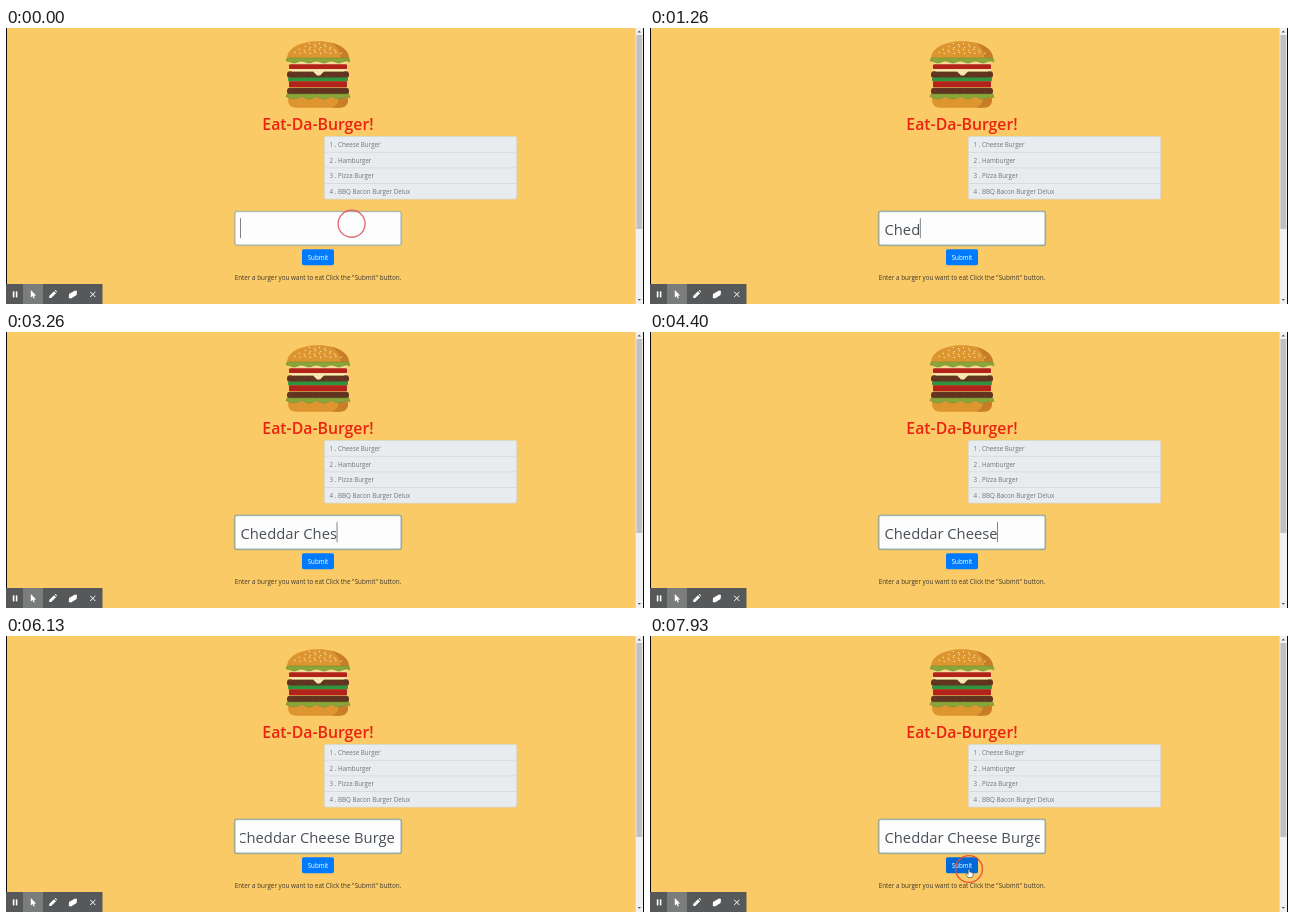
Write an HTML page with a canvas that moves like this. It is 638 by 276 pixels and loops after 8 s.

```html
<!DOCTYPE html>
<html lang="en">
<head>
<meta charset="utf-8">
<title>Eat-Da-Burger!</title>
<style>
  html, body { margin: 0; width: 100%; height: 100%; overflow: hidden; background: #faca67; }
  canvas { display: block; width: 638px; height: 276px; }
</style>
</head>
<body>
<canvas id="stage"></canvas>
<script>
const W = 638, H = 276, LOOP = 8000;
const canvas = document.getElementById('stage');
const ctx = canvas.getContext('2d');
const dpr = window.devicePixelRatio || 1;
canvas.width = W * dpr;
canvas.height = H * dpr;

const FONT = '"Open Sans", "Noto Sans", sans-serif';
const BURGERS = ['Cheese Burger', 'Hamburger', 'Pizza Burger', 'BBQ Bacon Burger Delux'];

// [time, text] for every key press
const KEYS = [[0, '']];
function type(text, times) {
  const before = KEYS[KEYS.length - 1][1];
  times.forEach((t, i) => KEYS.push([t, before + text.slice(0, i + 1)]));
}
type('Cheddar ', [800, 900, 1130, 1250, 1400, 1600, 1730, 1860]);
type('Ches', [2130, 2260, 2530, 3130]);
KEYS.push([3860, 'Cheddar Che']);
type('ese Burge', [4060, 4200, 4400, 4600, 4800, 4900, 5130, 5190, 5250]);

const BLINK = 535, BLUR = 7800, MOVE_START = 7000, MOVE_END = 7720;
const clamp = (v, a = 0, b = 1) => Math.min(b, Math.max(a, v));
const ease = k => k * k * (3 - 2 * k);
const mix = (a, b, k) => a + (b - a) * k;

function box(x, y, w, h, r, fill, stroke, lw = 1) {
  ctx.beginPath();
  ctx.roundRect(x, y, w, h, r);
  if (fill) { ctx.fillStyle = fill; ctx.fill(); }
  if (stroke) { ctx.strokeStyle = stroke; ctx.lineWidth = lw; ctx.stroke(); }
}

function poly(points, fill) {
  ctx.beginPath();
  points.forEach(([x, y]) => ctx.lineTo(x, y));
  ctx.closePath();
  ctx.fillStyle = fill;
  ctx.fill();
}

function label(text, x, y, size, color, align = 'left', weight = 400) {
  ctx.font = `${weight} ${size}px ${FONT}`;
  ctx.textAlign = align;
  ctx.fillStyle = color;
  ctx.fillText(text, x, y);
}

function lettuce(y) {
  ctx.beginPath();
  ctx.moveTo(281, y);
  ctx.lineTo(343, y);
  for (let x = 344; x >= 280; x--) ctx.lineTo(x, y + 4 + Math.sin(x * 0.42));
  ctx.closePath();
  ctx.fillStyle = '#88a63a';
  ctx.fill();
  ctx.strokeStyle = '#6b8a2e';
  ctx.lineWidth = 0.5;
  ctx.stroke();
}

function patty(y) {
  box(281, y, 62, 6.8, 3, '#623520');
  for (let i = 0; i < 16; i++) {
    box(284 + i * 3.6, y + 1.6 + (i * 7 % 4), 1.6, 0.9, 0.4, i % 2 ? '#4d2817' : '#744127');
  }
}

// bread with a shaded right side
function bread(path) {
  ctx.save();
  ctx.clip(path);
  ctx.fillStyle = '#dc952f';
  ctx.fillRect(280, 13, 64, 68);
  ctx.fillStyle = '#c97d28';
  ctx.beginPath();
  ctx.moveTo(322, 13);
  ctx.quadraticCurveTo(337, 20, 334, 34);
  ctx.lineTo(333, 70);
  ctx.quadraticCurveTo(333, 77, 324, 81);
  ctx.lineTo(345, 81);
  ctx.lineTo(345, 13);
  ctx.fill();
  ctx.restore();
}

function burger() {
  box(283, 34, 58, 10, 1, '#f1dc96');

  bread(new Path2D('M281 32 C280 20 295 13.3 312 13.3 S344 20 343 32 Z'));
  for (let row = 0; row < 4; row++) {
    const n = 4 + row * 2;
    for (let i = 0; i < n; i++) {
      const x = 311 + (i - (n - 1) / 2) * 5.1 + (row % 2);
      ctx.beginPath();
      ctx.ellipse(x, 15.6 + row * 2.9 + (i % 2), 0.9, 0.6, i, 0, 7);
      ctx.fillStyle = '#f5dca4';
      ctx.fill();
    }
  }

  lettuce(30);
  box(283, 36.3, 58, 4.8, 1.2, '#b3231b');
  patty(43.2);
  poly([[283, 41.4], [341, 41.4], [338, 43.4], [318, 43.6], [314, 47.6], [311, 47.6], [307, 43.6], [286, 43.4]], '#f6e6b0');
  box(282, 49.4, 60, 4, 1.5, '#2f9440');
  box(283, 53.2, 58, 6, 1, '#b3231b');
  patty(59.8);
  bread(new Path2D('M282 69.5 H342 V72 Q342 79.8 333 79.8 H291 Q282 79.8 282 72 Z'));
  lettuce(66);
}

function list() {
  const pitch = 15.72;
  box(318.5, 108.5, 192, pitch * 4 - 0.3, 1.6, '#e9ecef', '#d3d8dc', 0.7);
  BURGERS.forEach((name, i) => {
    const y = 108.5 + i * pitch;
    ctx.fillStyle = '#d0d5d9';
    if (i) ctx.fillRect(318.5, y - 0.4, 192, 0.7);
    label(`${i + 1} . ${name}`, 323.5, y + 10.4, 6.24, '#70767d');
  });
}

function field(t) {
  const focus = clamp(0.45 + t / 200);
  box(228.6, 183.2, 166.8, 34.2, 2.2, null, `rgba(60,125,150,${0.42 * focus})`, 1.5);
  box(229.1, 183.7, 165.8, 33.2, 1.8, '#fdfdfe', '#8fb4c6', 0.8);

  let last = 0;
  let text = '';
  for (const [at, value] of KEYS) {
    if (t >= at) { last = at; text = value; }
  }
  const focused = t < BLUR;
  const left = 234.5, right = 389.6;
  ctx.font = `400 14.75px ${FONT}`;
  const width = ctx.measureText(text).width;
  const scroll = focused ? Math.max(0, width + 0.7 - (right - left)) : 0;

  ctx.save();
  ctx.beginPath();
  ctx.rect(left - 0.5, 184, right - left + 0.7, 33);
  ctx.clip();
  label(text, left - scroll, 206.8, 14.75, '#495057');
  const on = Math.floor(Math.max(0, t - last - 70) / BLINK) % 2 === 0;
  if (focused && on) {
    ctx.fillStyle = '#5f656b';
    ctx.fillRect(left + width - scroll - 0.3, 190.2, 0.8, 20);
  }
  ctx.restore();
}

function arrow(x, y, s, fill, stroke) {
  const pts = [[0, 0], [0, 9], [2.1, 7.2], [3.5, 10.2], [4.8, 9.6], [3.5, 6.7], [6.3, 6.4]];
  poly(pts.map(([a, b]) => [x + a * s, y + b * s]), fill);
  if (stroke) { ctx.strokeStyle = stroke; ctx.lineWidth = 0.5; ctx.stroke(); }
}

function hand(x, y) {
  poly([[x - 0.7, y], [x + 0.7, y], [x + 0.8, y + 3], [x + 4, y + 3.8], [x + 4, y + 6.3],
    [x + 3, y + 8.6], [x - 1, y + 8.6], [x - 3.2, y + 5], [x - 2.2, y + 4.4], [x - 0.8, y + 5.4]], '#fff');
  ctx.strokeStyle = '#333';
  ctx.lineWidth = 0.55;
  ctx.stroke();
}

function ring(x, y, r, color, alpha) {
  ctx.globalAlpha = alpha;
  ctx.beginPath();
  ctx.arc(x, y, r, 0, Math.PI * 2);
  ctx.strokeStyle = color;
  ctx.lineWidth = 1.4;
  ctx.stroke();
  ctx.globalAlpha = 1;
}

function pointer(t) {
  const k = ease(clamp((t - MOVE_START) / (MOVE_END - MOVE_START)));
  return { x: mix(345.6, 319, k), y: mix(195.8, 233, k), moving: t >= MOVE_START };
}

function toolbar() {
  ctx.fillStyle = '#565859';
  ctx.fillRect(0, 256, 96.5, 20);
  ctx.fillStyle = '#7b7c7c';
  ctx.fillRect(17, 256, 20, 20);
  ctx.fillStyle = '#fff';
  ctx.fillRect(6.8, 263.4, 1.6, 6);
  ctx.fillRect(9.8, 263.4, 1.6, 6);
  arrow(24.8, 262, 0.84, '#fff');
  poly([[43.2, 270], [43.2, 268], [48, 263.2], [50, 265.2], [45.2, 270]], '#fff');
  poly([[48.6, 262.6], [49.5, 262], [51, 263.6], [50.6, 264.6]], '#fff');
  poly([[63, 266], [69, 262.6], [71, 263], [70.6, 267], [65, 270.4], [62.8, 270]], '#fff');
  ctx.strokeStyle = '#fff';
  ctx.lineWidth = 1;
  ctx.beginPath();
  ctx.moveTo(84.2, 263.8); ctx.lineTo(89.4, 269);
  ctx.moveTo(89.4, 263.8); ctx.lineTo(84.2, 269);
  ctx.stroke();
}

function scrollbar() {
  ctx.fillStyle = '#f1f1f1';
  ctx.fillRect(629.7, 0, 7.3, H);
  ctx.fillStyle = '#c1c1c1';
  ctx.fillRect(630.4, 7, 5.8, 194);
  poly([[631.6, 4.4], [635, 4.4], [633.3, 2.6]], '#555');
  poly([[631.6, 271], [635, 271], [633.3, 272.8]], '#555');
  ctx.fillStyle = '#0c0b08';
  ctx.fillRect(637, 0, 1, H);
  ctx.fillRect(0, 0, 1, H);
}

function draw(t) {
  ctx.setTransform(dpr, 0, 0, dpr, 0, 0);
  ctx.fillStyle = '#faca67';
  ctx.fillRect(0, 0, W, H);

  burger();
  label('Eat-Da-Burger!', 312, 101.8, 15.8, '#ea2410', 'center', 600);
  list();
  field(t);

  const p = pointer(t);
  const hover = p.moving && p.y > 221 && p.x > 296 && p.x < 328;
  box(296, 221.2, 32, 16, 1.6, hover ? '#0069d9' : '#007bff');
  label('Submit', 312, 231.8, 6.24, '#fff', 'center');
  label('Enter a burger you want to eat Click the "Submit" button.', 312, 251.8, 6.3, '#3f382a', 'center');

  scrollbar();
  toolbar();

  if (hover) hand(p.x, p.y);
  else if (p.moving && p.y > 217) arrow(p.x, p.y, 0.8, '#fff', '#222');

  if (t < 330) {
    const fade = clamp((t - 50) / 280);
    ring(345.6, 195.8, 13.5 + fade * 1.5, '#de5563', 0.85 * (1 - fade));
  }
  if (t >= BLUR) {
    const grow = clamp((t - BLUR) / 120);
    ring(319, 233, mix(8, 13.4, grow), '#ea4a2c', mix(0.5, 0.9, grow));
  }
}

const start = performance.now();
function tick() {
  draw((performance.now() - start) % LOOP);
  requestAnimationFrame(tick);
}
tick();
</script>
</body>
</html>
```
